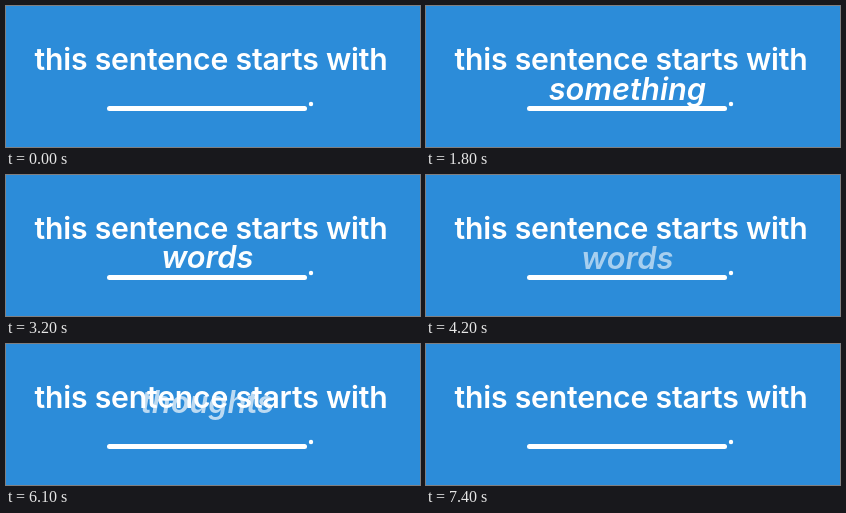
These frames come from a looping animation (414 by 141 pixels, 7.5 s). An HTML page:

```html
<!DOCTYPE html>
<html lang="en">
<head>
<meta charset="utf-8">
<title>this sentence starts with</title>
<style>
  html, body { margin: 0; width: 100%; height: 100%; overflow: hidden; background: #2c8cd9; }
  svg { display: block; }
  text { font: 600 30.2px Inter, "Liberation Sans", sans-serif; fill: #fff; text-anchor: middle; letter-spacing: -0.2px; }
  #word { font-size: 30.8px; font-style: italic; font-weight: 560; letter-spacing: 0; }
</style>
</head>
<body>
<svg width="414" height="141" viewBox="0 0 414 141">
  <text x="205" y="64">this sentence starts with</text>
  <text id="word" x="201.4" y="94"></text>
  <rect x="101" y="100" width="200" height="5" rx="2.5" fill="#fff"/>
  <circle cx="305" cy="98" r="2.2" fill="#fff"/>
</svg>
<script>
const WORDS = ["ideas", "something", "words", "letters", "thoughts"];
const SLOT = 1500, STEP = 100, LEAVE_AT = 1100;
const ENTER = 230, LEAVE = 240, DROP = 79;
const word = document.getElementById("word");

const clamp = v => Math.min(1, Math.max(0, v));
const easeOut = p => 1 - (1 - p) ** 2;

function draw(ms) {
  const t = Math.floor(ms / STEP) * STEP % (SLOT * WORDS.length);
  const local = t % SLOT;
  const enter = easeOut(clamp(local / ENTER));
  const leave = clamp((local - LEAVE_AT) / LEAVE);
  word.textContent = WORDS[Math.floor(t / SLOT)];
  word.setAttribute("transform", `translate(0 ${-DROP * (1 - enter)})`);
  word.setAttribute("opacity", enter * (1 - leave));
}

const start = performance.now();
function tick() {
  draw(performance.now() - start);
  requestAnimationFrame(tick);
}
tick();
</script>
</body>
</html>
```
